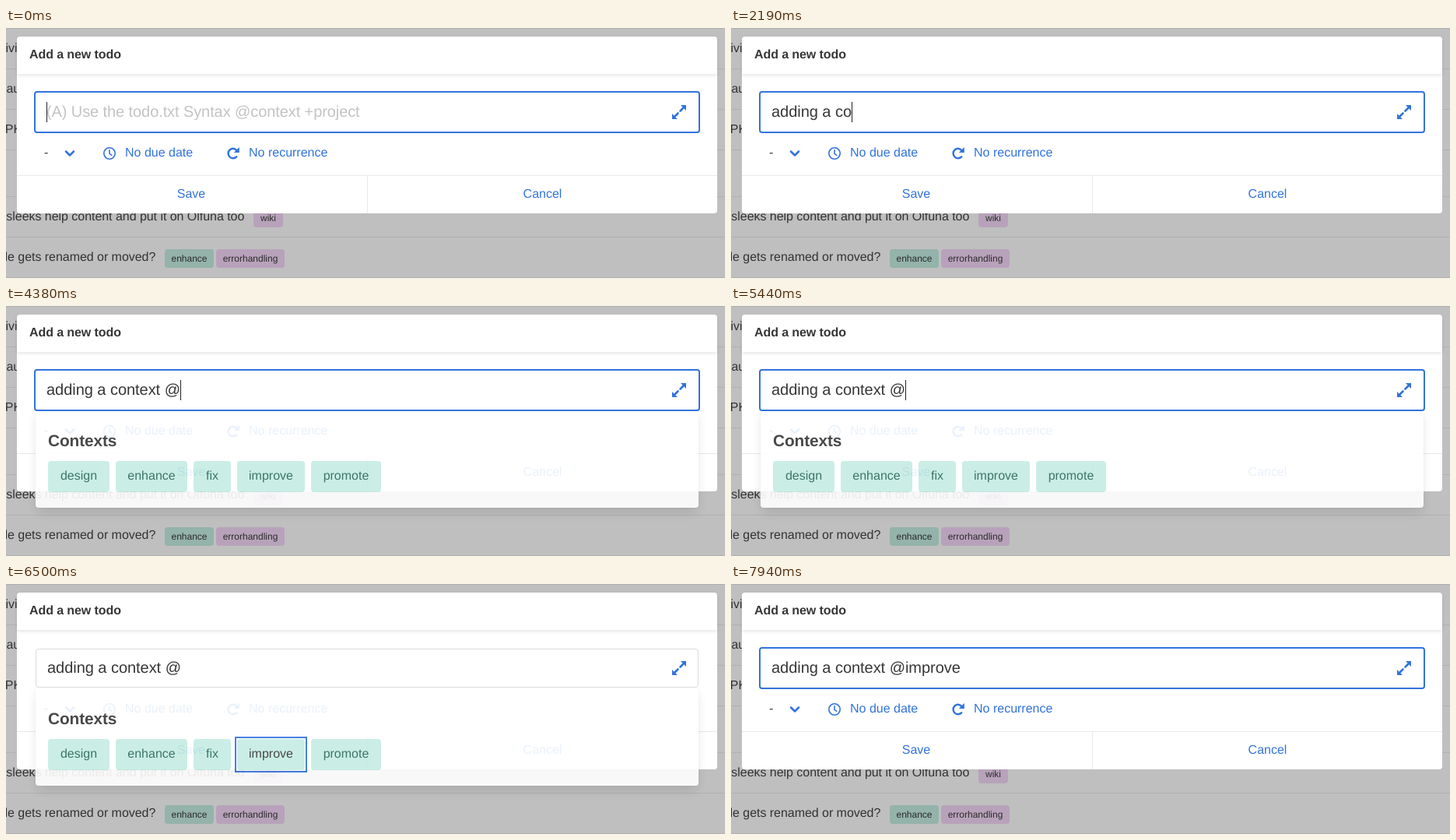
An HTML page that plays this animation: 924 by 321 pixels, repeating every 8 s.

```html
<!DOCTYPE html>
<html lang="en">
<head>
<meta charset="utf-8">
<title>Add a new todo</title>
<style>
  html, body { margin: 0; width: 100%; height: 100%; overflow: hidden; background: #bfbfbf; }
  body { position: relative; font: 16px/23px "Liberation Sans", Arial, sans-serif; color: #363636; text-rendering: geometricPrecision; }
  div, span, svg { position: absolute; box-sizing: border-box; white-space: pre; }
  .row { left: -2px; width: 930px; height: 53px; border: solid #b0b0b0; border-width: 1px 0; color: #333; letter-spacing: -.04px; }
  .row > span { top: 14px; }
  .tag { height: 24px; border-radius: 4px; font-size: 12px; line-height: 24px; letter-spacing: 0; text-align: center; color: #2b2b2b; }
  .teal { background: #94b3aa; }
  .mauve { background: #b8a2bb; }
  #modal { left: 14px; top: 11px; width: 900px; height: 227px; background: #fff; border-radius: 4px; }
  #head { left: 0; top: 0; width: 900px; height: 48px; border-radius: 4px 4px 0 0; box-shadow: 0 2px 4px rgba(10,10,10,.1); }
  #head span { left: 16px; top: 12px; font-weight: bold; letter-spacing: -.09px; }
  .link { color: #3273dc; }
  .foot { top: 178px; width: 451px; height: 49px; border-top: 1px solid #e9e9e9; padding-top: 12px; text-align: center; }
  #popup { left: 38px; top: 130px; width: 852px; height: 129px; background: #fff; opacity: .9; border-radius: 4px;
    box-shadow: 0 8px 16px -2px rgba(10,10,10,.13), 0 0 0 1px rgba(10,10,10,.02); }
  #popup b { position: absolute; left: 16px; top: 32px; font-size: 20.8px; letter-spacing: -.1px; }
  .pick { top: 69px; height: 40px; line-height: 39px; border-radius: 4px; text-align: center; background: #c5ede3; color: #2a6659; }
  .pick.on { color: #363636; }
  .pick.on::after { content: ""; position: absolute; inset: -3px; border: 2px solid #3273dc; }
  #field { left: 38px; top: 83px; width: 852px; height: 50px; background: #fff; border: 1px solid #dbdbdb; border-radius: 4px; }
  #field.on { left: 36px; top: 81px; width: 856px; height: 54px; border: 2px solid #3273dc; }
  #hint, #typed { left: 52px; top: 95px; font-size: 20px; line-height: 26px; letter-spacing: -.04px; }
  #hint { color: #c3c3c3; letter-spacing: -.09px; }
  #caret { top: 95px; width: 1px; height: 26px; background: #222; }
  svg { left: 0; top: 0; fill: none; stroke: #3273dc; }
  .solid { fill: #3273dc; stroke: none; }
</style>
</head>
<body>
<div class="row" style="top:0"><span style="left:1.5px">ivi</span></div>
<div class="row" style="top:52px"><span style="left:2.5px">au</span></div>
<div class="row" style="top:104px"><span style="left:.8px">PK</span></div>
<div class="row" style="top:216px"><span style="left:2.3px">sleeks help content and put it on Olfuna too</span>
  <div class="tag mauve" style="left:320px;top:15px;width:38px">wiki</div></div>
<div class="row" style="top:268px"><span style="left:.5px">le gets renamed or moved?</span>
  <div class="tag teal" style="left:206px;top:15px;width:63px">enhance</div>
  <div class="tag mauve" style="left:272px;top:15px;width:88px">errorhandling</div></div>

<div id="modal">
  <div id="head"><span>Add a new todo</span></div>
  <span style="left:35px;top:138px">-</span>
  <span class="link" style="left:139px;top:138px">No due date</span>
  <span class="link" style="left:298px;top:138px">No recurrence</span>
  <div class="foot link" style="left:0;padding-right:2px;border-right:1px solid #e9e9e9">Save</div>
  <div class="foot link" style="left:451px;width:449px">Cancel</div>
  <svg width="900" height="227" viewBox="14 11 900 227">
    <path d="M77 158.5l5 5 5-5" stroke-width="2.5" stroke-linecap="round" stroke-linejoin="round"/>
    <circle cx="133" cy="161" r="7.2" stroke-width="1.6"/>
    <path d="M133 156.8V161.4l2.8 2" stroke-width="1.6" stroke-linecap="round"/>
    <path d="M296.8 157.4A6.2 6.2 0 1 0 296.2 165.4" stroke-width="2.5" stroke-linecap="round"/>
    <path class="solid" d="M299.8 153v7h-7z"/>
  </svg>
</div>

<div id="popup"><b>Contexts</b></div>
<div id="field"></div>
<span id="hint">(A) Use the todo.txt Syntax @context +project</span>
<span id="typed"></span>
<div id="caret"></div>
<svg width="924" height="321">
  <path d="M871.5 101.5l-5 5M858.5 114.5l5-5" stroke-width="2.6" stroke-linecap="round"/>
  <path class="solid" stroke-linejoin="round" d="M867 99h7v7zM856 110v7h7z"/>
</svg>

<script>
const $ = id => document.getElementById(id);
const LOOP = 8000, text = "adding a context @improve ";

// [time, characters typed, caret x (0 = hidden)]
const steps = [
  [0, 0, 52], [560, 1, 63], [750, 2, 74], [940, 3, 85], [1130, 4, 89], [1220, 5, 100],
  [1310, 6, 112], [1500, 7, 117], [1810, 9, 133], [1940, 10, 144], [2190, 11, 155],
  [2380, 12, 166], [2630, 13, 171], [2690, 14, 182], [2940, 15, 192], [3060, 16, 198],
  [3380, 17, 203], [4000, 17, 0], [4250, 18, 224], [4880, 18, 0], [5440, 18, 224],
  [5630, 18, 0], [7310, 26, 299], [7940, 26, 0]
];
const popupOpen = 4380, popupClose = 7310;
const tabTimes = [5630, 5940, 6190, 6500];

const picks = [["design", 16, 79], ["enhance", 103, 92], ["fix", 203, 48], ["improve", 259, 87], ["promote", 354, 90]]
  .map(([name, x, w]) => {
    const el = document.createElement("div");
    el.className = "pick";
    el.textContent = name;
    el.style.left = x + "px";
    el.style.width = w + "px";
    return $("popup").appendChild(el);
  });

function draw(t) {
  const [, count, caretX] = steps.findLast(s => s[0] <= t);
  const open = t >= popupOpen && t < popupClose;
  const picked = open ? tabTimes.findLastIndex(s => s <= t) : -1;
  const focused = picked < 0;

  $("typed").textContent = text.slice(0, count);
  $("typed").style.left = (focused ? 52 : 53) + "px";
  $("hint").hidden = count > 0;
  $("caret").hidden = !caretX;
  $("caret").style.left = caretX + "px";
  $("field").className = focused ? "on" : "";
  $("popup").hidden = !open;
  picks.forEach((el, i) => el.classList.toggle("on", i === picked));
}

const start = performance.now();
function tick() {
  draw((performance.now() - start) % LOOP);
  requestAnimationFrame(tick);
}
tick();
</script>
</body>
</html>
```
